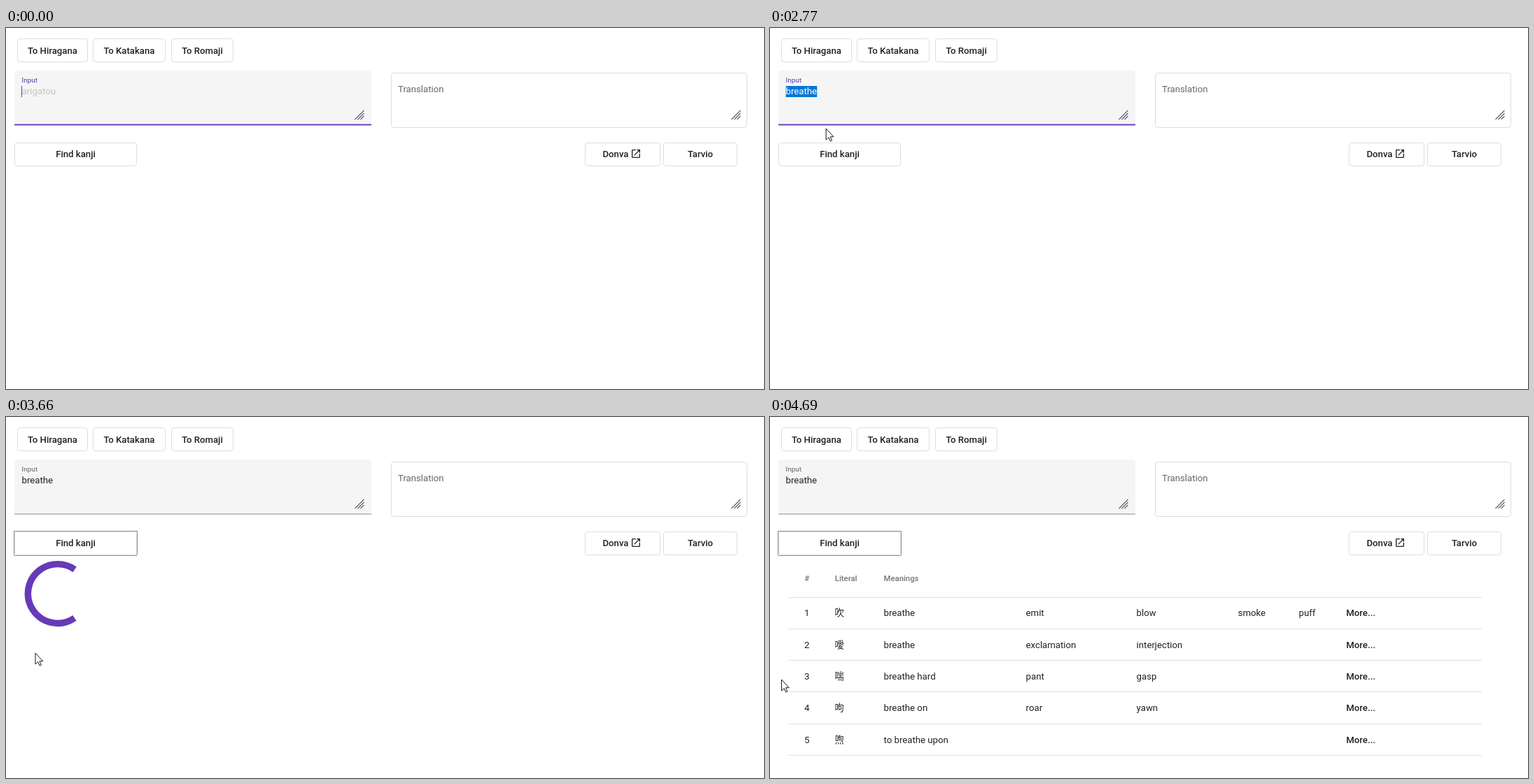
Write an HTML page with a canvas that moves like this. It is 1083 by 517 pixels and loops after 5.22 s.

```html
<!DOCTYPE html>
<html lang="en">
<head>
<meta charset="utf-8">
<title>Kanji finder</title>
<style>
html, body { margin: 0; width: 100%; height: 100%; overflow: hidden; background: #fff; }
canvas { display: block; width: 1083px; height: 517px; }
</style>
</head>
<body>
<canvas id="stage"></canvas>
<script>
const W = 1083, H = 517, LOOP = 5220;
const canvas = document.getElementById('stage');
const ctx = canvas.getContext('2d', { alpha: false });
const dpr = window.devicePixelRatio || 1;
canvas.width = W * dpr;
canvas.height = H * dpr;

const INK = '#212121', PURPLE = '#673ab7', RULE = '#e0e0e0';
const FOCUS_LOST = 3180, TABLE_AT = 4290;

const openIcon = new Path2D('M19 19H5V5h7V3H5a2 2 0 0 0-2 2v14a2 2 0 0 0 2 2h14c1.1 0 2-.9 2-2v-7h-2v7z' +
  'M14 3v2h3.59l-9.83 9.83 1.41 1.41L19 6.41V10h2V3h-7z');
const arrow = new Path2D('M0 0V16L3.7 12.6L6.1 18L8.4 17L6 11.7H10.8Z');
const hand = new Path2D('M-1 1.2Q0 -.6 1.6 1V7Q3.2 5.8 4.4 7.4Q6 6.6 7.2 8.2Q9 7.6 9.8 9.6' +
  'V14.5Q9.6 17 8 18.5V21H-.2V19L-4.6 13.4Q-5.6 11.4 -3.6 10.9L-1 13Z');

// Cursor tip: time, x, y
const path = [
  [1950, -6, 136], [2100, 10, 118], [2430, 45, 92], [2560, 47, 94],
  [2770, 80, 144], [2970, 98, 169], [3040, 100, 177], [3290, 100, 177],
  [3390, 88, 215], [3530, 58, 294], [3660, 42, 338], [3870, 32, 352],
  [4080, 26, 360], [4220, 25, 362], [4500, 25, 362], [4690, 16.5, 376]
];

// Typing: time of each letter, then of its caret
const word = 'breathe';
const keys = [[70, 70], [340, 470], [670, 670], [870, 940], [1140, 1140], [1410, 1480], [1750, 1750]];

const rows = [
  ['吹', 'breathe', 'emit', 'blow', 'smoke', 'puff'],
  ['噯', 'breathe', 'exclamation', 'interjection'],
  ['喘', 'breathe hard', 'pant', 'gasp'],
  ['呴', 'breathe on', 'roar', 'yawn'],
  ['喣', 'to breathe upon']
];
const columns = [93, 163, 366, 524, 669, 756];

function setFont(size, weight) {
  ctx.font = `${weight} ${size}px Roboto, "Noto Sans CJK JP", "Noto Sans CJK", sans-serif`;
}

// Baselines sit on whole pixels.
function text(str, x, y, { size = 13.2, weight = 400, color = INK, align = 'left' } = {}) {
  setFont(size, weight);
  ctx.fillStyle = color;
  ctx.textAlign = align;
  ctx.fillText(str, x, Math.round(y));
}

function rect(x, y, w, h, color) {
  ctx.fillStyle = color;
  ctx.fillRect(x, y, w, h);
}

function box(x, y, w, h, fill, stroke = '#dedede', radius = 3.5) {
  ctx.beginPath();
  ctx.roundRect(x + .5, Math.round(y) + .5, w - 1, h - 1, radius);
  ctx.fillStyle = fill;
  ctx.fill();
  ctx.strokeStyle = stroke;
  ctx.lineWidth = 1;
  ctx.stroke();
}

function button(label, x, y, w, fill = '#fff') {
  box(x, y, w, 34, fill);
  text(label, x + w / 2, y + 21.7, { weight: 500, align: 'center' });
}

function grip(x) {
  ctx.strokeStyle = '#5d5d70';
  ctx.lineWidth = 1.1;
  ctx.beginPath();
  for (const d of [13, 9, 5]) {
    ctx.moveTo(x - d, 131);
    ctx.lineTo(x, 131 - d);
  }
  ctx.stroke();
}

function dottedFrame(x, y, w, h) {
  const right = x + w - .5, bottom = y + h - .5;
  ctx.strokeStyle = '#222';
  ctx.lineWidth = 1;
  ctx.setLineDash([1, 1]);
  ctx.beginPath();
  for (const edge of [y + .5, bottom]) {
    ctx.moveTo(x + 1, edge);
    ctx.lineTo(x + w - 1, edge);
  }
  for (const edge of [x + .5, right]) {
    ctx.moveTo(edge, y + 1);
    ctx.lineTo(edge, y + h - 1);
  }
  ctx.stroke();
  ctx.setLineDash([]);
}

function bezierEase(p) {
  let lo = 0, hi = 1;
  for (let i = 0; i < 20; i++) {
    const u = (lo + hi) / 2, v = 1 - u;
    if (1.05 * v * v * u + .75 * v * u * u + u * u * u < p) lo = u;
    else hi = u;
  }
  return lo * lo * (3 - 2 * lo);
}

function drawInput(t) {
  const focused = t < FOCUS_LOST;
  ctx.beginPath();
  ctx.roundRect(12, 61, 510, 78, [4, 4, 0, 0]);
  ctx.fillStyle = '#f5f5f5';
  ctx.fill();
  if (focused) rect(12, 137.6, 510, 1.9, PURPLE);
  else rect(12, 138.5, 510, 1, '#8c8c8c');
  text('Input', 22.6, 78.4, { size: 9.9, color: focused ? '#4a3fae' : '#646464' });
  grip(511.5);

  const typed = keys.filter(k => t >= k[0]).length;
  const carets = keys.filter(k => t >= k[1]).length;
  const str = word.slice(0, typed);
  const selected = t >= 2430 && focused;
  if (selected) rect(22.6, 83, 44.6, 16, '#0078d7');
  if (typed) text(str, 22.6, 95.2, { color: selected ? '#fff' : INK });
  else text('arigatou', 22.6, 95.2, { color: '#c9c3bb' });
  if (t < 1950 && carets === typed) {
    setFont(13.2, 400);
    rect(Math.round(22.6 + ctx.measureText(str).width - .2), 83, 1, 16, PURPLE);
  }
}

function drawForm(t) {
  button('To Hiragana', 16, 15, 101);
  button('To Katakana', 124, 15, 104);
  button('To Romaji', 236, 15, 89);
  drawInput(t);

  box(550, 64, 509, 79, '#fff', '#dcdcdc', 4);
  text('Translation', 560, 92.4, { color: '#666' });
  grip(1049.5);

  const y = 163.6;
  button('Find kanji', 12, y, 175, t >= 3040 && t < 3600 ? '#f5f5f5' : '#fff');
  if (t >= FOCUS_LOST) dottedFrame(11, 163, 177, 36);

  box(827, y, 108, 34, '#fff');
  text('Donva', 889.5, y + 21.7, { weight: 500, align: 'right' });
  ctx.save();
  ctx.translate(892, 172);
  ctx.scale(2 / 3, 2 / 3);
  ctx.fill(openIcon);
  ctx.restore();
  button('Tarvio', 939, y, 106);
}

// The arc grows and shrinks every half second while the whole ring turns in two.
function drawSpinner(t) {
  const age = t - 3066;
  const dash = Math.min(age, 1093);
  const half = Math.floor(dash / 500);
  const ease = bezierEase(dash % 500 / 500);
  const base = Math.floor(half / 2) * 270;
  const from = base + (half % 2 ? 270 * ease : 0);
  const to = base + (half % 2 ? 288 : 18 + 270 * ease);
  const turn = age * .18 - 90;
  const rad = Math.PI / 180;
  ctx.beginPath();
  ctx.arc(73.8, 253, 42.4, (from + turn) * rad, (to + turn) * rad);
  ctx.strokeStyle = PURPLE;
  ctx.lineWidth = 9.4;
  ctx.stroke();
}

function drawTable() {
  const head = { size: 11.3, weight: 500, color: '#757575' };
  text('#', 49.3, 235, head);
  text('Literal', 92.8, 235, head);
  text('Meanings', 162.6, 235, head);
  rect(26, 258, 991, 1, RULE);
  rows.forEach((cells, i) => {
    const y = 285.3 + i * 45.3;
    text(String(i + 1), 49, y);
    cells.forEach((cell, c) => text(cell, columns[c] - .4, y));
    text('More...', 823.3, y, { weight: 500 });
    rect(26, Math.floor(303.2 + i * 45.3), 991, 1, RULE);
  });
}

function cursorAt(t) {
  const next = path.findIndex(p => p[0] > t);
  if (next < 0) return path[path.length - 1].slice(1);
  const [t0, x0, y0] = path[next - 1], [t1, x1, y1] = path[next];
  const p = (t - t0) / (t1 - t0);
  return [x0 + (x1 - x0) * p, y0 + (y1 - y0) * p];
}

function drawCursor(t) {
  if (t < path[0][0]) return;
  const [x, y] = cursorAt(t);
  if (t >= FOCUS_LOST && t < 3320) {
    ctx.beginPath();
    ctx.arc(100, 177, 11.5, 0, Math.PI * 2);
    ctx.fillStyle = 'rgba(247,238,48,.78)';
    ctx.fill();
  }
  ctx.save();
  ctx.translate(x, y);
  if (x > 12 && y < 139) {
    rect(-.5, -7, 1, 14, '#111');
    rect(-3, -8, 6, 1, '#111');
    rect(-3, 7, 6, 1, '#111');
  } else {
    const shape = t >= 3040 && y < 198 ? hand : arrow;
    ctx.fillStyle = '#fff';
    ctx.strokeStyle = '#15151f';
    ctx.lineWidth = 1;
    ctx.fill(shape);
    ctx.stroke(shape);
    if (shape === hand) {
      ctx.beginPath();
      for (const fx of [1.6, 4.4, 7.2]) {
        ctx.moveTo(fx, 7);
        ctx.lineTo(fx, 11);
      }
      ctx.stroke();
    }
  }
  ctx.restore();
}

function draw(now) {
  const t = now % LOOP;
  ctx.setTransform(dpr, 0, 0, dpr, 0, 0);
  rect(0, 0, W, H, '#fff');
  drawForm(t);
  if (t >= TABLE_AT) drawTable();
  else if (t >= 3390) drawSpinner(t);
  drawCursor(t);
}

const start = performance.now();
function tick() {
  draw(performance.now() - start);
  requestAnimationFrame(tick);
}
tick();
</script>
</body>
</html>
```
